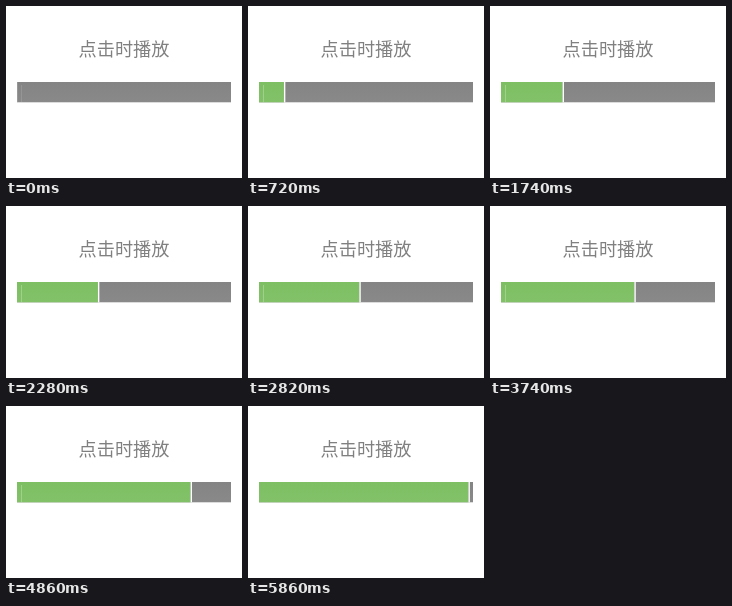
An HTML page that plays this animation: 236x172 px, repeating every 5880 ms.

```html
<!DOCTYPE html>
<html lang="zh-CN">
<head>
<meta charset="utf-8">
<title>点击时播放</title>
<style>
  html, body { margin: 0; width: 100%; height: 100%; overflow: hidden; background: #fff; }
  svg { display: block; width: 236px; height: 172px; }
  text { font: 300 18.2px "Noto Sans CJK SC", "Noto Sans CJK", sans-serif; fill: #808080; }
</style>
</head>
<body>
<svg viewBox="0 0 236 172">
  <defs>
    <linearGradient id="grey" x2="0" y2="1">
      <stop offset="0" stop-color="#848484"/>
      <stop offset="1" stop-color="#898989"/>
    </linearGradient>
    <linearGradient id="green" x2="0" y2="1">
      <stop offset="0" stop-color="#7ebf63"/>
      <stop offset="1" stop-color="#82c168"/>
    </linearGradient>
  </defs>
  <text x="72.5" y="50">点击时播放</text>
  <rect x="11" y="76" width="214" height="20.3" fill="url(#grey)"/>
  <rect id="fill" x="11" y="76" width="0" height="20.3" fill="url(#green)"/>
  <rect id="mark" x="15" y="79" width="1" height="17" fill="#fff" opacity=".2"/>
  <rect id="head" y="76" width="1.4" height="20.3" fill="#fff"/>
</svg>
<script>
  const LOOP = 5880, STEP = 20, LEFT = 11;
  const START = 10.1, SPEED = 0.0359;
  const MARK_END = 5120;
  const [fill, mark, head] = ["fill", "mark", "head"].map(id => document.getElementById(id));
  const origin = performance.now();

  function draw(now) {
    const elapsed = Math.max(0, now - origin) % LOOP;
    const t = Math.floor(elapsed / STEP) * STEP;
    const x = START + SPEED * t;
    fill.setAttribute("width", Math.max(0, x - LEFT));
    head.setAttribute("x", x);
    // The playhead starts out faint at the edge of the bar.
    head.setAttribute("opacity", Math.min(1, 0.3 + t / 150));
    mark.setAttribute("opacity", t < MARK_END ? (t < 150 ? 0.12 : 0.25) : 0);
    requestAnimationFrame(draw);
  }
  draw(origin);
</script>
</body>
</html>
```
